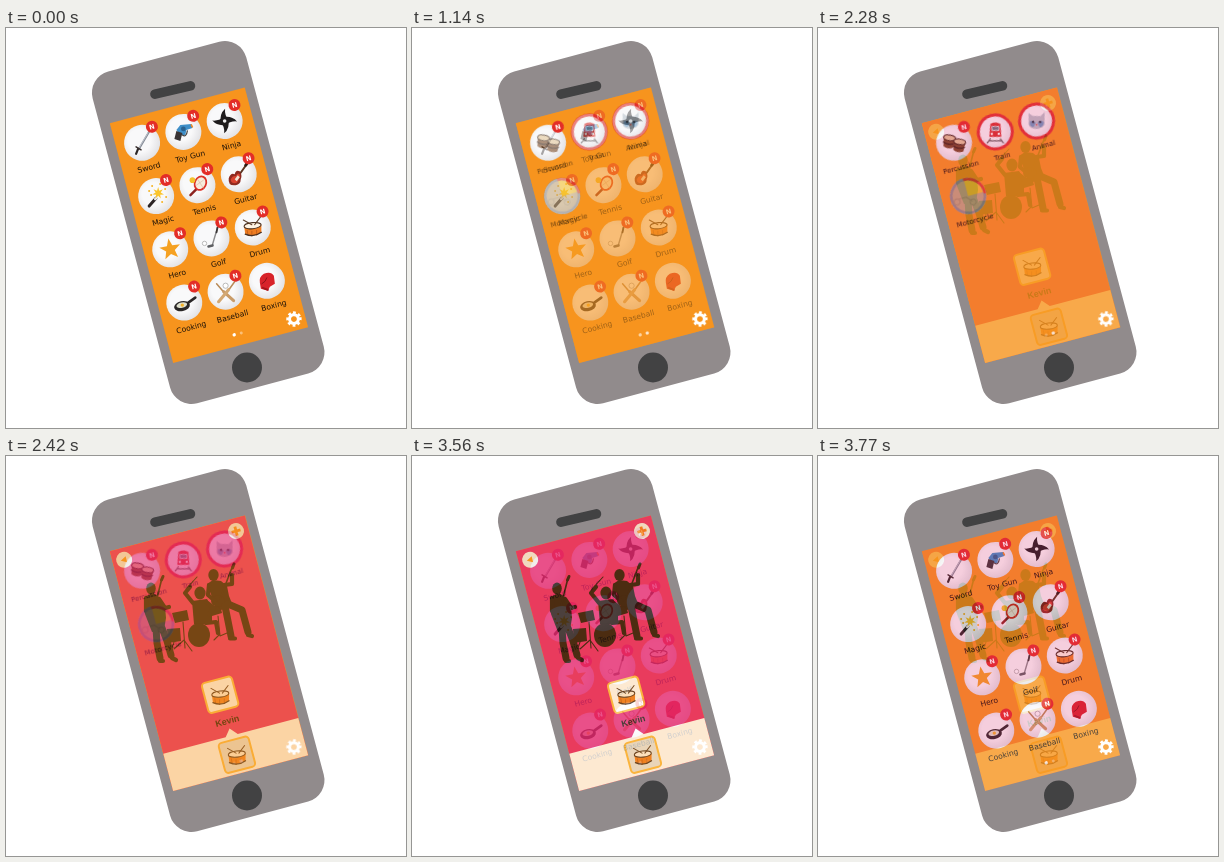
Recreate the animation shown at these times as an HTML page. Size 400 px wide and 400 px high, loop 3840 ms.

```html
<!DOCTYPE html>
<html lang="en">
<head>
<meta charset="utf-8">
<title>Instrument phone</title>
<style>
html, body { margin: 0; width: 100%; height: 100%; overflow: hidden; background: #fff; }
svg { display: block; width: 100vw; height: 100vh; }
text { text-anchor: middle; font-family: "DejaVu Sans", sans-serif; fill: #1d1208; }
.badge { font: bold 6.6px "DejaVu Sans", sans-serif; fill: #fff; }
.name { font: bold 9px "Liberation Sans", Arial, sans-serif; }
.line { fill: none; stroke-linecap: round; stroke-linejoin: round; }
#more { animation: more 3840ms step-end infinite; }
#band { animation: band 3840ms step-end infinite; }
/* 70 ms steps of one fifth */
@keyframes more {
  0% { opacity: 0; }
  26.04% { opacity: .2; }
  27.86% { opacity: .4; }
  29.68% { opacity: .6; }
  31.51% { opacity: .8; }
  33.33% { opacity: 1; }
  92.7%, 100% { opacity: 0; }
}
@keyframes band {
  0% { opacity: 0; }
  59.37% { opacity: .2; }
  61.19% { opacity: .4; }
  63.02% { opacity: .6; }
  64.84% { opacity: .8; }
  66.66% { opacity: 1; }
  92.7% { opacity: .8; }
  94.53% { opacity: .6; }
  96.35% { opacity: .4; }
  98.17% { opacity: .2; }
  100% { opacity: 0; }
}
</style>
</head>
<body>
<svg viewBox="0 0 400 400">
  <defs>
    <radialGradient id="bubble" cx=".44" cy=".42" r=".62">
      <stop offset=".5" stop-color="#f9f9fa"/><stop offset="1" stop-color="#e0e0e3"/>
    </radialGradient>
    <rect id="screen" width="139.6" height="248"/>
    <g id="gear" transform="translate(128 236.4)">
      <circle r="4.4" fill="none" stroke="#fff" stroke-width="3"/>
      <circle r="6.4" fill="none" stroke="#fff" stroke-width="2.6" stroke-dasharray="2.7 2.327"/>
    </g>
    <g id="drum" transform="scale(.95)">
      <path d="M-9-1L-8 7Q1 11 9 5L9-3Z" fill="#ee7d22"/>
      <path class="line" d="M-6 3L-5 8M-1 4V9M4 3V8" stroke="#b9581a" stroke-width=".8"/>
      <path class="line" d="M-8 7Q1 11 9 5" stroke="#4a3020" stroke-width="1.3"/>
      <ellipse cy="-2" rx="9" ry="3.2" fill="#fff4e4" stroke="#4a3020" stroke-width="1.1" transform="rotate(-6)"/>
      <path class="line" d="M-10-8L-1-3M8-11L2-3" stroke="#5a3c28" stroke-width="1.1"/>
    </g>
  </defs>

  <g transform="translate(202.2 194.5) rotate(-15)">
    <rect x="-79.5" y="-171.7" width="159" height="343.4" rx="22" fill="#918b8c"/>
  </g>
  <g transform="translate(166.7 62) rotate(-13)">
    <rect x="-23" y="-4.8" width="46" height="9.6" rx="4.8" fill="#424243"/>
  </g>
  <circle cx="241" cy="339.5" r="15" fill="#424243"/>

  <g id="apps" transform="translate(103.8 95.2) rotate(-14.8)">
    <use href="#screen" fill="#f7941d"/>
    <use href="#gear"/>
    <circle cx="66.2" cy="236.4" r="1.7" fill="#fff"/>
    <circle cx="73.5" cy="236.4" r="1.5" fill="#fbc078"/>
  </g>

  <g id="more" transform="translate(103.8 95.2) rotate(-14.8)">
    <use href="#screen" fill="#f7941d"/>
    <use href="#gear"/>
    <circle cx="66.2" cy="236.4" r="1.5" fill="#fbb764"/>
    <circle cx="73.5" cy="236.4" r="1.7" fill="#fff"/>
  </g>

  <g id="band">
    <g transform="translate(103.8 95.2) rotate(-14.8)">
      <use href="#screen" fill="#e6266d"/>
      <path d="M0 209.5H64.5L70.5 202L77 209.5H139.6V248H0Z" fill="#fff"/>
      <g fill="#efebe8">
        <circle cx="11.7" cy="12" r="8"/><circle cx="127.2" cy="12.8" r="8"/>
      </g>
      <path d="M8.2 12L14 9V15Z" fill="#f7941d"/>
      <path d="M127.2 8.2V17.4M122.6 12.8H131.8" stroke="#f58a1f" stroke-width="2.8"/>
      <rect x="54.5" y="151.5" width="31" height="31" rx="3.5" fill="#fff" stroke="#fcbd45" stroke-width="2"/>
      <rect x="55.4" y="213.8" width="31" height="31" rx="3.5" fill="#e6e5df" stroke="#fcbd45" stroke-width="2"/>
      <text class="name" x="70.2" y="197.2">Kevin</text>
    </g>
    <use href="#drum" x="214.5" y="240"/>
    <use href="#drum" x="231" y="300"/>
    <g fill="#22130f">
      <ellipse cx="145" cy="132.5" rx="4.8" ry="6"/>
      <path d="M138 141L147 137L153 141L159 150L160 162L158 174L146 176L139 158Z"/>
      <ellipse cx="194" cy="137" rx="5.6" ry="6.4"/>
      <path d="M186 145L201 143L206 152L206 168L188 168Z"/>
      <path d="M166 157L181 154L183 164L169 167Z"/>
      <path d="M161 173L174 172L175 185L162 187Z"/>
      <ellipse cx="193" cy="179" rx="11" ry="12"/>
      <path d="M203 151L214 149L216 157L206 160Z"/>
      <ellipse cx="207.5" cy="119" rx="5.2" ry="6"/>
      <path d="M201 128L207 124L215 125L221 130L223 140L227 150L215 154L208 146Z"/>
      <ellipse cx="212" cy="145" rx="7" ry="5.5"/>
    </g>
    <g class="line" stroke="#22130f">
      <path stroke-width="7" d="M150 172L151 187L154 202M156 172L161 185L165 199M219 150L222 165L225 180M222 148L236 154L242 176"/>
      <path stroke-width="4.2" d="M140 142V155L147 160M153 143L159 152L163 151M154 205H157M166 202L170 204M187 147L179 137L184 131M200 146L208 152L203 158M200 167L210 166L212 177M203 129L202 139L209 145M218 129L226 128L226 119M224 182.500H229M242 179L246 180"/>
      <path stroke-width="3" d="M155.500 124L157 120.500M226.500 112L228 108"/>
      <path stroke-width="1.6" d="M149 150L156 122M214 143L227 109"/>
      <path stroke-width="1.1" d="M180 133L191 121M177 166L179 192M178 184L168 193M178 184L186 195M168 186L166 192M212 160L214 180L221 177M214 178L208 184"/>
    </g>
  </g>
</svg>
<script>
const line = (d, color, width) => `<path class="line" d="${d}" stroke="${color}" stroke-width="${width}"/>`;
const fill = (d, color) => `<path d="${d}" fill="${color}"/>`;
const dot = (x, y, r, color) => `<circle cx="${x}" cy="${y}" r="${r}" fill="${color}"/>`;

function star(n, outer, inner, color, turn = -90) {
  const pts = Array.from({ length: 2 * n }, (_, i) => {
    const a = (turn + i * 180 / n) * Math.PI / 180, r = i % 2 ? inner : outer;
    return `${(r * Math.cos(a)).toFixed(2)},${(r * Math.sin(a)).toFixed(2)}`;
  });
  return `<polygon points="${pts.join(" ")}" fill="${color}"/>`;
}

const blade = turn => `<g transform="rotate(${turn})">${fill("M-4 1Q-4-8 3-12Q1-6 4 0Z", "#1f1d1e")}</g>`;

const bongo = (x, y) => `<g transform="translate(${x} ${y}) rotate(8)">` +
  fill("M-6-4L-5 5Q0 8 5 5L6-4Z", "#7a4a26") + line("M-5.5 1Q0 4 5.5 1", "#3d2414", 1.3) +
  `<ellipse cy="-4" rx="6" ry="2.8" fill="#e3c79a" stroke="#3d2414"/></g>`;

const ring = line("M0-17A17 17 0 1 1-.1-17", "#e2322c", 3);

const art = {
  Sword: line("M-3 6L7-11", "#858b96", 1.9) + line("M-3 5L6-10", "#d5d9e0", .7) +
    line("M-6 11L-4 6", "#2c2626", 2.2) + line("M-6 4L-1 7", "#3b3130", 1.5),
  "Toy Gun": fill("M-7-2L-3-7L8-8L9-4L3-2L2 3L-3 3Z", "#3f8fc8") +
    fill("M-7-1L-1 1L-3 9L-9 7Z", "#3a3536") + dot(0, -3, 2.4, "#2b628f") +
    line("M-1 3Q3 6 4-1", "#444", 1.2) + line("M8-7L9-5", "#f08a24", 1.6),
  Ninja: [-12, 78, 168, 258].map(blade).join("") + dot(0, 0, 1.8, "#eee"),
  Magic: line("M-7 10L0 2", "#2c2526", 3) + line("M-1 3L1 1", "#eee", 2.4) +
    `<g transform="translate(2 -3)">${star(7, 6, 2.6, "#fbc52c")}</g>` +
    [[-7, -5], [-4, -10], [4, -12], [9, -7], [10, 1], [6, 6], [-5, -1]].map(([x, y]) => dot(x, y, 1, "#f5b324")).join(""),
  Tennis: line("M-7 10L-1 4", "#8c2320", 2.4) +
    `<ellipse cx="3" cy="-2" rx="5.6" ry="7" fill="#f6ecdc" stroke="#dc3226" stroke-width="1.8" transform="rotate(25 3 -2)"/>` +
    line("M0-6L6 3M-1 0L6-5", "#d9b7a0", .6) + dot(-5, -5, 2.8, "#f4c22b"),
  Guitar: line("M-2 4L8-10", "#5b3520", 2) + line("M7-9L9-12", "#2d1b12", 3) +
    fill("M-10 4Q-8-2-4 0Q-3-5 1-3Q4 1 2 5Q2 10-3 11Q-11 12-10 4Z", "#8e2a20") +
    fill("M-8 5Q-6 1-3 2Q-1-2 1 0Q2 3 0 5Q-1 9-4 9Q-8 9-8 5Z", "#d8422f") +
    fill("M-4 5L-1 1L1 3L-2 7Z", "#f1e3d3"),
  Hero: star(5, 11, 4.6, "#f5a122", -100),
  Golf: line("M6-11L1 6", "#8b8b8d", 1.4) + line("M6-11L5-6", "#3b3737", 1.8) +
    line("M1 7L-3 8", "#5f6063", 2.6) + `<circle cx="-7" cy="5" r="2.2" fill="#fff" stroke="#aaa" stroke-width=".8"/>`,
  Drum: `<use href="#drum"/>`,
  Cooking: line("M4 0L11-5", "#2a2727", 2.6) +
    `<g transform="rotate(-12)"><ellipse cx="-3" cy="3" rx="8" ry="5" fill="#2a2727"/>` +
    `<ellipse cx="-3" cy="2" rx="5.4" ry="2.7" fill="#dfe0cd"/></g>` + dot(-2, 2.5, 1.7, "#f4b32a"),
  Baseball: line("M-9-8L-3-1", "#b98b57", 1.5) + line("M-2 0L8 9", "#c99b67", 3.1) +
    line("M9-10L4-3", "#b98b57", 1.5) + line("M3-2L-7 10", "#d3a873", 3.1) +
    `<circle cx="0" cy="-6" r="2.6" fill="#fff" stroke="#aaa" stroke-width=".8"/>`,
  Boxing: fill("M-7 2Q-8-4-3-7Q4-10 7-5L8 3L3 6L1 10L-6 8Z", "#d8232a") +
    line("M-5 3Q-1 1 0-3", "#8e1218", 1) + line("M-4 7L1 9", "#a3171d", 1.8),
  Percussion: bongo(-5, -1) + bongo(5, 3),
  Train: fill("M-5-8Q0-11 5-8L6 5H-6Z", "#d8302c") + fill("M-4-6H4V-1H-4Z", "#dfe6ea") +
    fill("M-3-5H3V-2H-3Z", "#6b7680") + dot(-3.5, 2, 1.2, "#fff") + dot(3.5, 2, 1.2, "#fff") +
    line("M-5 7L-8 11M5 7L8 11M-6 9H6", "#6a6565", 1.3),
  Animal: fill("M-8-8L-4-5H4L8-9L8 4Q5 8 0 8Q-6 8-8 4Z", "#b9c3cc") +
    fill("M-7 1Q-4-2-1 2L-3 6Q-7 6-7 1ZM7 1Q4-2 1 2L3 6Q7 6 7 1Z", "#6d9cc4") +
    dot(-3.5, 1, 1.2, "#2c3640") + dot(3.5, 1, 1.2, "#2c3640") + fill("M-1.3 3H1.3L0 5Z", "#d66a6a"),
  Motorcycle: dot(0, 0, 18, "#c3a67b") + line("M0-16.8A16.8 16.8 0 1 1-.1-16.8", "#938d89", 2.6) +
    fill("M0 0L-4-15A15.5 15.5 0 0 1 15-4Z", "#f4c02e") +
    line("M-4-16.4A17 17 0 0 1 16.5-4", "#e0452b", 2.6) +
    line("M-8 6A3 3 0 1 1-8 5.9M8 6A3 3 0 1 1 8 5.9M-9 3L-2 1L4 5", "#ad956f", 1.2)
};

function cell(name, i, size, badge, extra = "") {
  const x = 26.2 + 42.7 * (i % 3), y = 27.2 + 55.1 * Math.floor(i / 3);
  const mark = badge ? dot(13.6, -13, 6, "#e32d27") + `<text class="badge" x="13.6" y="-10.6">N</text>` : "";
  return `<g transform="translate(${x} ${y})">
    <circle r="18" fill="url(#bubble)"/>${extra}
    <g transform="rotate(14.8)">${art[name]}</g>${mark}
    <text x=".4" y="28.2" font-size="${size}">${name}</text></g>`;
}

const names = Object.keys(art);
const add = (id, html) => document.getElementById(id).insertAdjacentHTML("beforeend", html);
add("apps", names.slice(0, 12).map((n, i) => cell(n, i, 7.6, i < 11)).join(""));
add("more", names.slice(12).map((n, i) => cell(n, i, 6.9, i === 0, i === 1 || i === 2 ? ring : "")).join(""));
</script>
</body>
</html>
```
